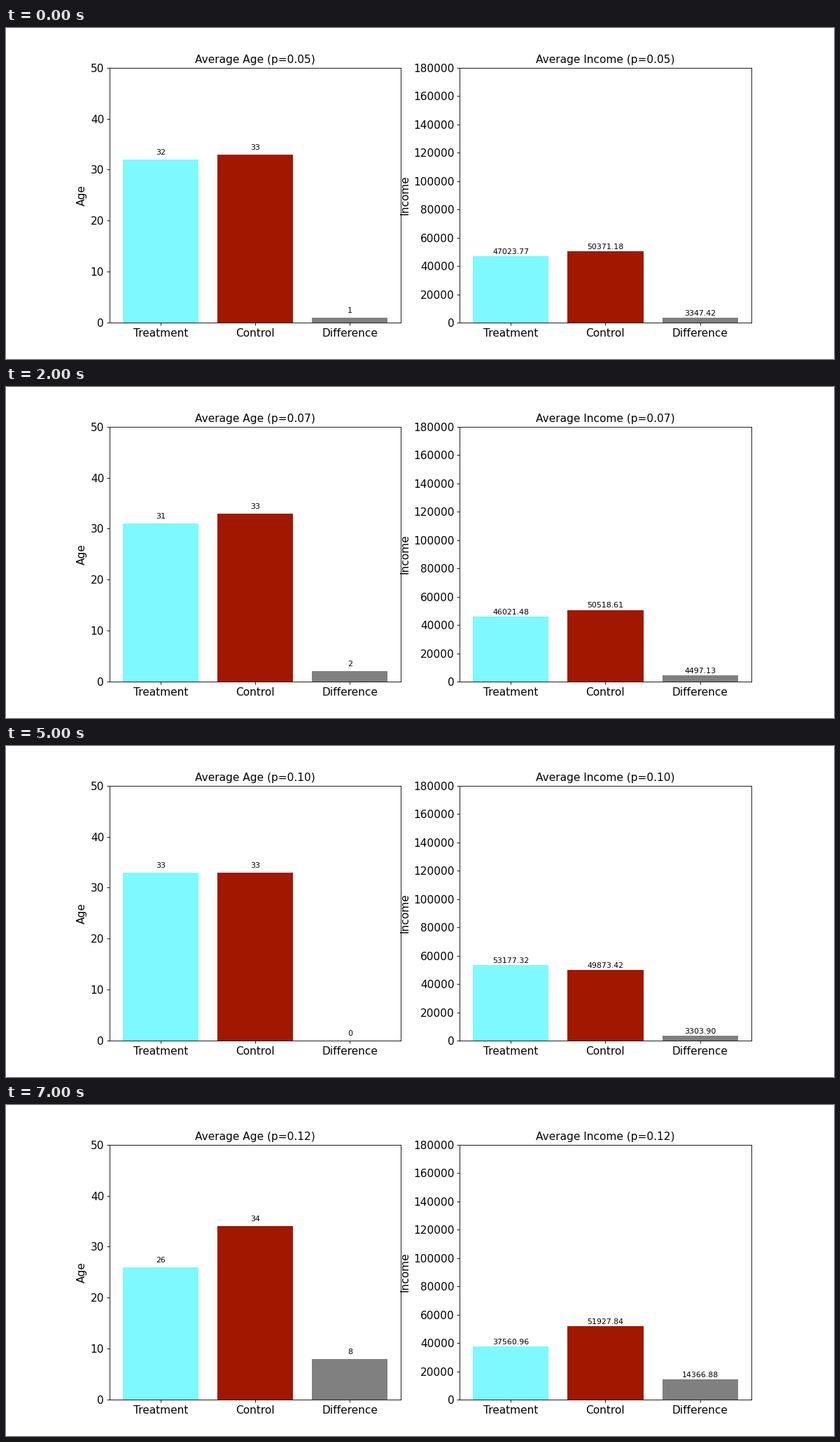
A matplotlib script that plays this animation: 1183 px wide and 473 px high, repeating every 8000 ms.

```python
import matplotlib.pyplot as plt
from matplotlib.animation import FuncAnimation

WIDTH, HEIGHT = 1183, 473
DPI = WIDTH / 15
GROUPS = ["Treatment", "Control", "Difference"]
COLORS = ["#7df9ff", "#a21700", "#808080"]
FIRST_P, P_STEP = 0.05, 0.01
LABEL_GAP = 0.5   # in data units
LABEL_LIFT = 1.2  # in points

plt.rcParams.update({
    "font.family": "DejaVu Sans",
    "font.size": 14,
    "axes.titlesize": 14,
    "axes.labelsize": 14,
    "xtick.labelsize": 14,
    "ytick.labelsize": 14,
})


class BarPanel:
    """Treatment mean, control mean and their absolute difference.

    The control mean follows from the treatment mean, the share p of
    treated people and the mean of the whole population.
    """

    def __init__(self, ax, name, treatment, population, top, tick_step, digits):
        self.ax, self.name, self.digits = ax, name, digits
        self.treatment, self.population = treatment, population
        self.bars = ax.bar(GROUPS, [0, 0, 0], color=COLORS)
        self.labels = [
            ax.annotate("", (i, 0), xytext=(0, LABEL_LIFT),
                        textcoords="offset points",
                        ha="center", va="bottom", fontsize=10)
            for i in range(len(GROUPS))
        ]
        ax.set_ylim(0, top)
        ax.set_yticks(range(0, top + 1, tick_step))
        ax.set_ylabel(name)

    def means(self, step, p):
        treated = self.treatment[step]
        control = (self.population - p * treated) / (1 - p)
        if self.digits == 0:
            control = round(control)
        return treated, control, abs(treated - control)

    def show(self, step):
        p = FIRST_P + P_STEP * step
        values = self.means(step, p)
        for i, (bar, label, value) in enumerate(
                zip(self.bars, self.labels, values)):
            bar.set_height(value)
            label.xy = (i, value + LABEL_GAP)
            label.set_text(f"{value:.{self.digits}f}")
        self.ax.set_title(f"Average {self.name} (p={p:.2f})")


fig, (age_ax, income_ax) = plt.subplots(
    1, 2, figsize=(WIDTH / DPI, HEIGHT / DPI), dpi=DPI
)
fig.subplots_adjust(left=0.125, right=0.9, bottom=0.11, top=0.88, wspace=0.201)

ages = [32, 36, 31, 31, 32, 33, 36, 26]
incomes = [47023.766, 52567.65, 46021.48, 45640.37,
           48402.35, 53177.32, 57535.40, 37560.96]
panels = [
    BarPanel(age_ax, "Age", ages, 33, 50, 10, 0),
    BarPanel(income_ax, "Income", incomes, 50203.812, 180000, 20000, 2),
]


def update(step):
    for panel in panels:
        panel.show(step)


anim = FuncAnimation(
    fig, update, frames=len(ages), init_func=lambda: update(0),
    interval=1000, repeat=True, repeat_delay=0, blit=False,
)
plt.show()
```
